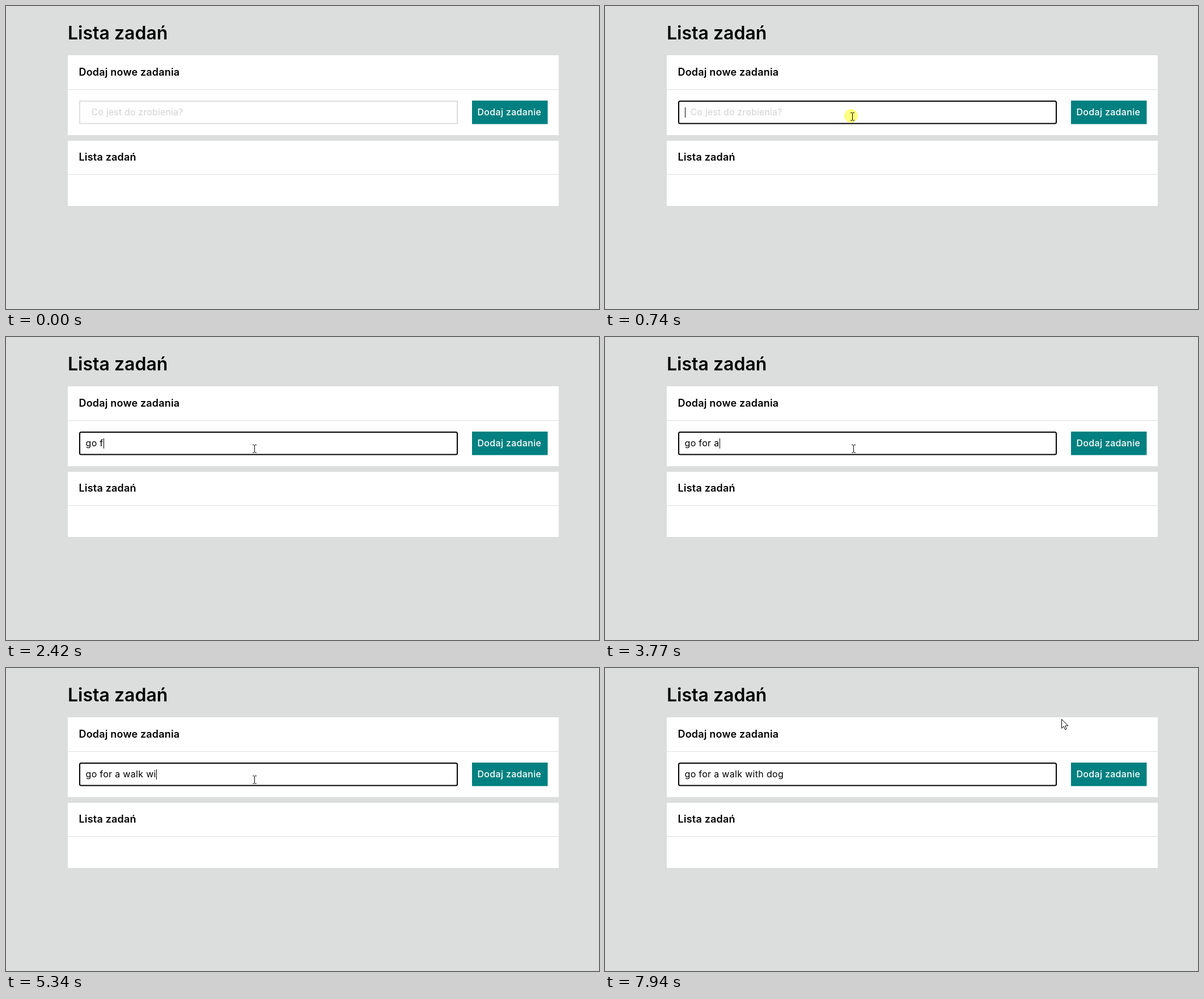
An HTML page that plays this animation: 1046 px wide and 535 px high, repeating every 8000 ms.

```html
<!DOCTYPE html>
<html lang="pl">
<head>
<meta charset="utf-8">
<title>Lista zadań</title>
<style>
  html, body { margin: 0; height: 100%; overflow: hidden; background: #dcdedd; }
  svg { display: block; width: 1046px; height: 535px; }
  text { font: 400 16px Inter, sans-serif; letter-spacing: .02em; white-space: pre; }
  .title { font-size: 32px; font-weight: 600; letter-spacing: 0; }
  .heading { font-size: 18px; font-weight: 600; letter-spacing: .01em; }
  .button { font-weight: 500; fill: #fff; }
  #hint { fill: #d0d2d1; letter-spacing: .01em; }
</style>
</head>
<body>
<svg viewBox="0 0 1046 535">
  <text class="title" x="109" y="59">Lista zadań</text>

  <path fill="#fff" d="M109 87H975V228H109ZM109 238H975V353H109Z"/>
  <path fill="#dcdedd" d="M109 147H975V148H109ZM109 297H975V298H109Z"/>
  <text class="heading" x="128.5" y="123">Dodaj nowe zadania</text>
  <text class="heading" x="128.5" y="273">Lista zadań</text>

  <rect id="field" x="130" y="168" width="666" height="39.5" fill="#fff" stroke-width="2"/>
  <text id="hint" x="150.5" y="193">Co jest do zrobienia?</text>
  <text id="typed" x="140.5" y="193"></text>
  <rect id="caret" y="179" width="1" height="18"/>

  <rect x="822" y="167" width="133.5" height="41.5" fill="#008080"/>
  <text class="button" x="831.5" y="193">Dodaj zadanie</text>

  <circle id="click" cx="434" cy="194" r="12" fill="#ffff80"/>
  <g id="pointer">
    <path id="arrow" d="M.5 .5V16.5L4.2 13 6.6 18.8 9.2 17.7 6.8 12H11.8Z" fill="#fff" stroke="#000"/>
    <path id="beam" d="M-3 -6.5H0M1 -6.5H4M.5 -6V6.5M-3 7H0M1 7H4" fill="none" stroke="#000"/>
  </g>
</svg>
<script>
const LOOP = 8000, FOCUS = 630, BLINK = 540;
const PHRASE = 'go for a walk with dog ';
const KEY_TIMES = [
  1570, 1720, 1890, 2420, 2590, 2990, 3220, 3770, 3940, 4090, 4240, 4410,
  4640, 4940, 5260, 5340, 5670, 5880, 5950, 6260, 6430, 7140, 7220
];
// time, x, y, shape
const POINTER = [
  [70, 476, 402, 'arrow'], [150, 480, 330, 'arrow'], [230, 476, 272, 'arrow'],
  [310, 468, 240, 'arrow'], [400, 455, 231, 'arrow'], [460, 446, 212, 'arrow'],
  [530, 438, 198, 'beam'], [630, 436, 195, 'beam'], [770, 438, 197, 'beam'],
  [7790, 470, 188, 'beam'], [7870, 763, 88, 'arrow'], [7940, 805, 90, 'arrow']
];

const el = id => document.getElementById(id);
const show = (id, on) => el(id).setAttribute('visibility', on ? 'visible' : 'hidden');

function draw(t) {
  const focused = t >= FOCUS;
  el('field').setAttribute('stroke', focused ? '#000' : '#dcdedd');
  el('field').setAttribute('rx', focused ? 2.5 : 0);

  const count = KEY_TIMES.filter(time => time <= t).length;
  const typed = el('typed');
  typed.textContent = PHRASE.slice(0, count);
  show('hint', count === 0);

  const lastInput = count ? KEY_TIMES[count - 1] : FOCUS;
  const typedWidth = count ? typed.getComputedTextLength() : 0;
  el('caret').setAttribute('x', Math.round(140.5 + typedWidth));
  show('caret', focused && t - lastInput < BLINK);

  const [, x, y, shape] = POINTER.findLast(step => step[0] <= t) || [0, 0, 0, ''];
  el('pointer').setAttribute('transform', `translate(${x} ${y})`);
  show('arrow', shape === 'arrow');
  show('beam', shape === 'beam');
  show('click', focused && t < 850);
}

function tick() {
  draw(performance.now() % LOOP);
  requestAnimationFrame(tick);
}
tick();
</script>
</body>
</html>
```
